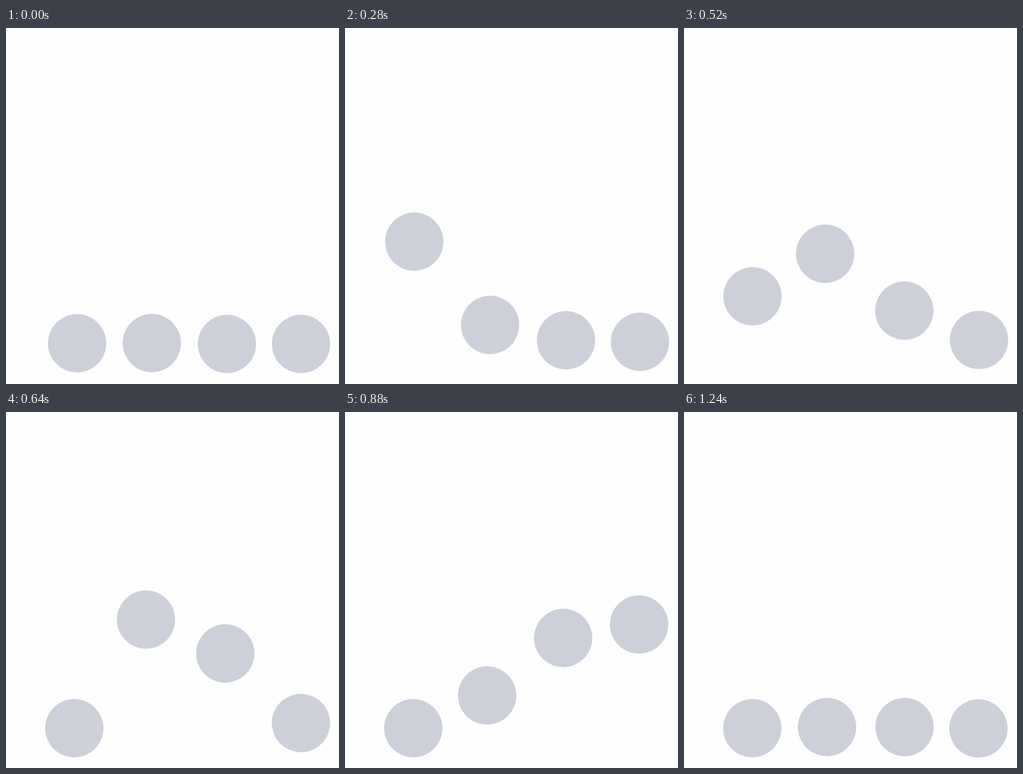
An HTML page for the animation above (1.28 s loop, 724 by 774 pixels).

```html
<!DOCTYPE html>
<html lang="en">
<head>
<meta charset="utf-8">
<title>Bouncing dots</title>
<style>
  html, body { margin: 0; width: 100%; height: 100%; overflow: hidden; background: #fefefe; }
  svg { display: block; width: 724px; height: 774px; }
  circle { r: 63.4px; fill: #cdd0d9; animation: 1280ms infinite; }

  /* Each leg is linear, sampled every 40 ms (3.125% of the loop). */
  .a { animation-name: a; }
  .b { animation-name: b; }
  .c { animation-name: c; }
  .d { animation-name: d; }

  @keyframes a {
    0%       { transform: translate(154.5px, 685.5px); animation-timing-function: steps(7); }
    21.875%  { transform: translate(150.5px, 464.5px); animation-timing-function: steps(2); }
    28.125%  { transform: translate(149.3px, 444.5px); animation-timing-function: steps(7); }
    50%, to  { transform: translate(148.4px, 687.5px); }
  }
  @keyframes b {
    0%       { transform: translate(317px, 685px); animation-timing-function: steps(6); }
    18.75%   { transform: translate(316.9px, 671.3px); animation-timing-function: steps(8); }
    43.75%   { transform: translate(305.5px, 465px); animation-timing-function: steps(3); }
    53.125%  { transform: translate(303.8px, 444.5px); animation-timing-function: steps(7); }
    75%, to  { transform: translate(311px, 685px); }
  }
  @keyframes c {
    0%       { transform: translate(480.5px, 687px); animation-timing-function: steps(11); }
    34.375%  { transform: translate(480.4px, 674.3px); animation-timing-function: steps(7); }
    56.25%   { transform: translate(475.2px, 465.2px); animation-timing-function: steps(3); }
    65.625%  { transform: translate(473.3px, 452.5px); animation-timing-function: steps(6); }
    84.375%, to { transform: translate(479.5px, 685px); }
  }
  @keyframes d {
    0%       { transform: translate(641.3px, 687px); animation-timing-function: steps(16); }
    50%      { transform: translate(641.3px, 676.3px); animation-timing-function: steps(6); }
    68.75%   { transform: translate(639.3px, 462px); animation-timing-function: steps(3); }
    78.125%  { transform: translate(640px, 444.5px); animation-timing-function: steps(6); }
    96.875%, to { transform: translate(640.2px, 688px); }
  }
</style>
</head>
<body>
<svg viewBox="0 0 724 774">
  <circle class="a" r="63.4"/>
  <circle class="b" r="63.4"/>
  <circle class="c" r="63.4"/>
  <circle class="d" r="63.4"/>
</svg>
</body>
</html>
```
